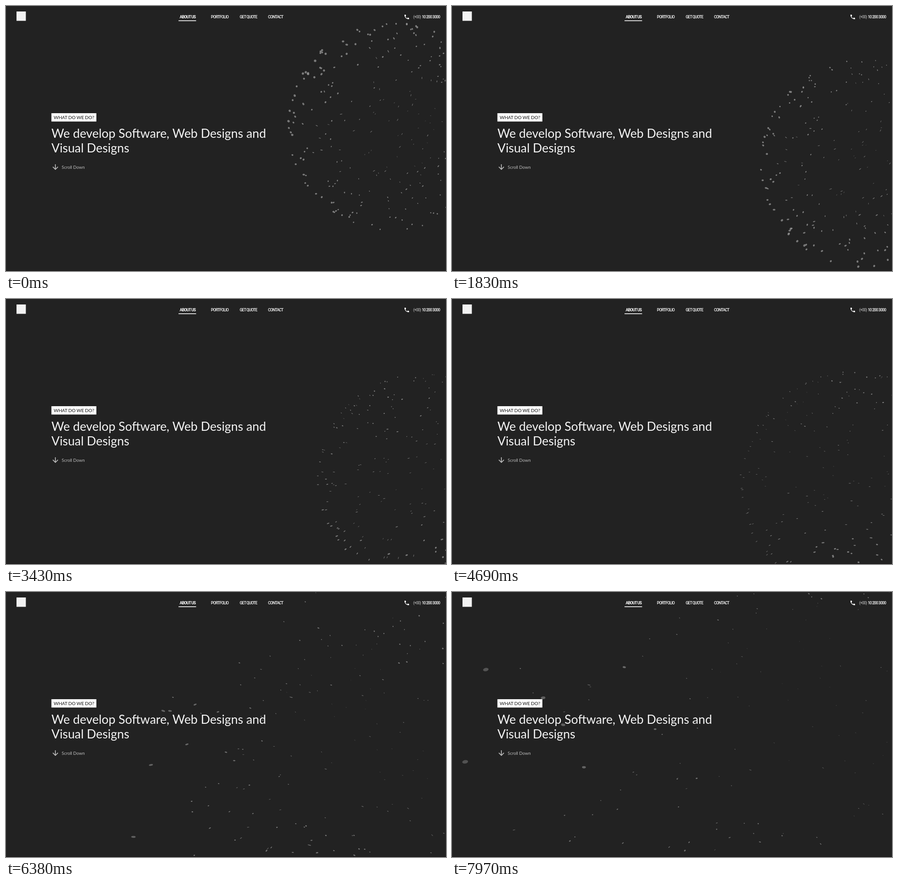
An HTML page for the animation above (8 s loop, 964 px wide and 581 px high).

```html
<!DOCTYPE html>
<html lang="en">
<head>
<meta charset="utf-8">
<style>
html, body { margin: 0; width: 100%; height: 100%; overflow: hidden; background: #222; }
svg { display: block; width: 964px; height: 581px; }
text { fill: #fff; font-family: Lato, sans-serif; }
.nav text { font: 500 8.8px Roboto, sans-serif; letter-spacing: -.9px; }
.nav .on { font-weight: 700; }
.nav .code { fill: #aaa; }
.title text { font-size: 26.8px; fill: #f4f4f4; }
.tag { font-size: 10.2px; letter-spacing: -.15px; fill: #111; }
.hint { font-size: 9.5px; fill: #bdbdbd; }
</style>
</head>
<body>
<svg viewBox="0 0 964 581">
  <rect width="964" height="581" fill="#222"/>
  <g id="dots" fill="#999"></g>
  <rect y="580" width="964" height="1" fill="#171314"/>
  <rect x="23" y="12" width="20.5" height="20.5" fill="#f2f2f2"/>
  <g class="nav">
    <text class="on" x="380.5" y="26.7">ABOUT US</text>
    <text x="449" y="26.7">PORTFOLIO</text>
    <text x="512" y="26.7">GET QUOTE</text>
    <text x="574" y="26.7">CONTACT</text>
    <text class="code" x="892" y="27">(+00)</text>
    <text x="911" y="27">10 200 3000</text>
    <rect x="378" y="31.5" width="38.5" height="1.6" fill="#fff"/>
    <path transform="translate(871.3 17.2) scale(.56)" fill="#fff" d="M6.6 10.8c1.4 2.8 3.8 5.1 6.6 6.6l2.2-2.2c.3-.3.7-.4 1-.2 1.1.4 2.3.5 3.6.5.5 0 1 .5 1 1V20c0 .5-.5 1-1 1C10.6 21 3 13.4 3 4c0-.5.5-1 1-1h3.5c.5 0 1 .5 1 1 0 1.2.2 2.4.6 3.6.1.3 0 .7-.3 1z"/>
  </g>
  <rect x="99.5" y="235" width="98.5" height="18.3" fill="#fff"/>
  <text class="tag" x="104.5" y="248">WHAT DO WE DO?</text>
  <g class="title">
    <text x="99.5" y="288.5">We develop Software, Web Designs and</text>
    <text x="99.5" y="320.7">Visual Designs</text>
  </g>
  <path d="M108.2 347v11M102.6 352.7l5.6 5.6l5.6-5.6" fill="none" stroke="#bdbdbd" stroke-width="1.7"/>
  <text class="hint" x="122" y="357">Scroll Down</text>
</svg>
<script>
const LOOP = 8000, DOTS = 300, SHARDS = 12, CAMERA = 4;
const GOLDEN = Math.PI * (3 - Math.sqrt(5));

const clamp = (v, lo, hi) => Math.min(hi, Math.max(lo, v));
const smooth = v => { const u = clamp(v, 0, 1); return u * u * (3 - 2 * u); };
const unit = v => { const l = Math.hypot(...v) || 1; return v.map(c => c / l); };
const dot = (a, b) => a[0] * b[0] + a[1] * b[1] + a[2] * b[2];
const cross = (a, b) => [a[1] * b[2] - a[2] * b[1], a[2] * b[0] - a[0] * b[2], a[0] * b[1] - a[1] * b[0]];

let seed = 41;
function rnd() {
  seed = (seed * 1664525 + 1013904223) >>> 0;
  return seed / 4294967296;
}

const group = document.getElementById('dots');
function ellipse() {
  return group.appendChild(document.createElementNS('http://www.w3.org/2000/svg', 'ellipse'));
}
function place(el, x, y, rx, ry, angle, alpha) {
  el.setAttribute('rx', rx.toFixed(2));
  el.setAttribute('ry', ry.toFixed(2));
  el.setAttribute('opacity', alpha.toFixed(3));
  el.setAttribute('transform', `translate(${x.toFixed(2)} ${y.toFixed(2)}) rotate(${angle.toFixed(1)})`);
}

// discs scattered over a sphere, a little denser at the poles
const dots = Array.from({ length: DOTS }, (_, i) => {
  const u = (i + rnd()) / DOTS;
  return {
    theta: .1 + .97 * (.7 * Math.acos(1 - 2 * u) + .3 * Math.PI * u),
    phi: i * GOLDEN + 1.5 * rnd(),
    speed: .3 + 1.7 * rnd() ** 2,
    size: .8 + .35 * rnd(),
    el: ellipse()
  };
});

// pieces that fly left, past the camera
const shards = Array.from({ length: SHARDS }, (_, i) => ({
  reach: 80 + 850 * (i + rnd()) / SHARDS,
  y: 250 + 230 * rnd(),
  drift: 320 * (rnd() - .55),
  angle: 50 * (rnd() - .5),
  el: ellipse()
}));

function drawDots(t) {
  const cx = 868 + 48 * Math.sin(.72 * t - .48);
  const cy = 264 + 142 * Math.sin(t / 3);
  const radius = 220 + 28 * smooth((t - 3) / 3);
  const burst = 1.2 * Math.max(0, (t - 4.6) / 3.4) ** 1.3;

  // the pole tips from the viewer over the top to the back
  const turn = smooth((t - .5) / 6.5), tilt = .35 + 1.9 * turn;
  const pole = unit([-.46 + .84 * turn ** 1.7, -Math.sin(tilt), Math.cos(tilt)]);
  const side = unit(cross(pole, [1, 0, 0])), up = cross(pole, side);

  // larger discs at the upper left, later at the bottom
  const gx = -.25 * (1 - turn);
  const gy = (.5 - .65 * Math.exp(-t / 1.4)) / (1 + burst);

  for (const d of dots) {
    const c = Math.cos(d.theta), s = Math.sin(d.theta), a = d.phi + .12 * t;
    const p = pole.map((v, k) => v * c + s * (side[k] * Math.cos(a) + up[k] * Math.sin(a)));
    // each disc faces along its meridian
    const along = dot(pole, p);
    const n = unit(pole.map((v, k) => v - along * p[k]));
    const r = 1 + burst * d.speed;
    const zoom = CAMERA / Math.max(.8, CAMERA - p[2] * r);
    const size = clamp(1.85 * d.size * (1 + gx * p[0] + gy * p[1]) * zoom * (1 - .15 * burst), .7, 5);
    place(d.el, cx + radius * r * p[0] * zoom, cy + radius * r * p[1] * zoom,
      size, size * Math.max(.2, Math.abs(n[2])),
      Math.atan2(n[1], n[0]) * 180 / Math.PI + 90,
      clamp(.95 - .08 * size, .4, .8) * (1 - .12 * burst));
  }
}

function drawShards(t) {
  const u = Math.max(0, (t - 5) / 3), fade = smooth((t - 5) / .7);
  for (const s of shards) {
    const size = 1.3 + s.reach / 120 * u;
    place(s.el, 640 - s.reach * u ** 1.2, s.y + s.drift * u,
      size, size * (.3 + .3 * u), s.angle * (1.5 - u), fade * clamp(.85 - .07 * size, .32, .75));
  }
}

function frame(now) {
  const t = now % LOOP / 1000;
  drawDots(t);
  drawShards(t);
  requestAnimationFrame(frame);
}
frame(0);
</script>
</body>
</html>
```
